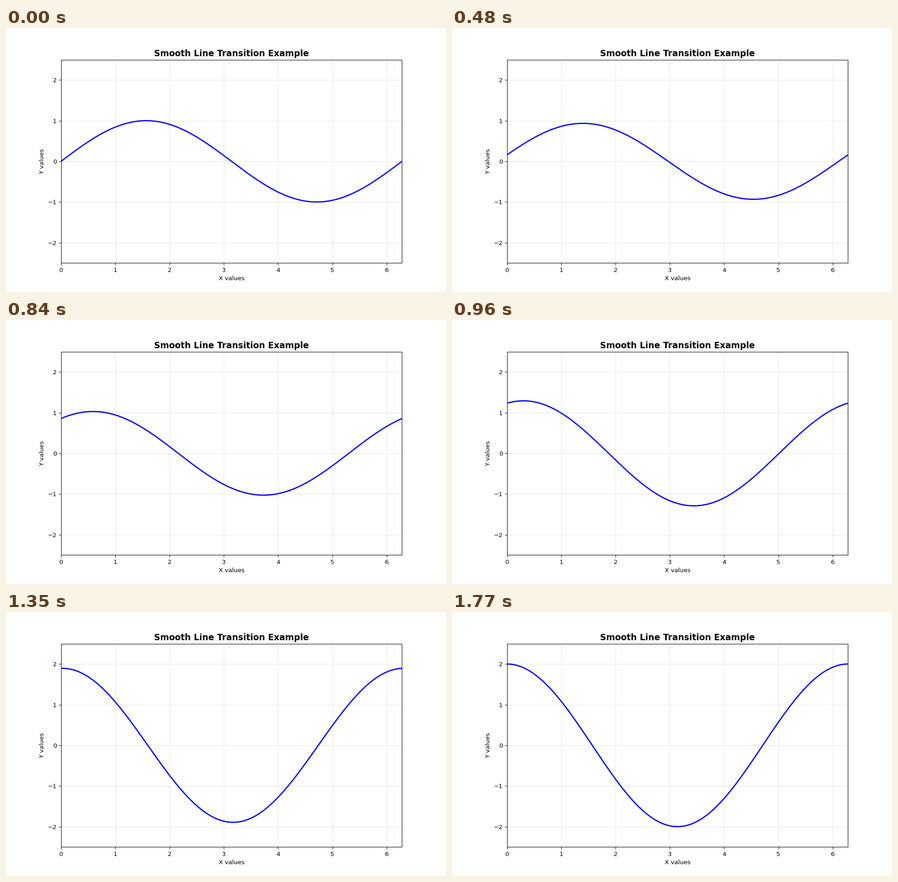
Write a matplotlib script that moves like this. It is 966 by 580 pixels and loops after 1800 ms.

```python
import numpy as np
import matplotlib.pyplot as plt
from matplotlib.animation import FuncAnimation

WIDTH, HEIGHT, DPI = 966, 580, 96.6
FRAMES, INTERVAL = 60, 30

x = np.linspace(0, 2 * np.pi, 200)
start = np.sin(x)
end = 2 * np.cos(x)


def ease_in_out_cubic(t):
    return 4 * t**3 if t < 0.5 else 1 - 4 * (1 - t) ** 3


# The small offset keeps the pixel size from rounding down.
fig, ax = plt.subplots(
    figsize=((WIDTH + 0.001) / DPI, (HEIGHT + 0.001) / DPI), dpi=DPI
)
line, = ax.plot(x, start, color="blue", linewidth=2)
ax.set_xlim(0, 2 * np.pi)
ax.set_ylim(-2.5, 2.5)
ax.set_title("Smooth Line Transition Example", fontsize=14, fontweight="bold")
ax.set_xlabel("X values")
ax.set_ylabel("Y values")
ax.grid(True, alpha=0.3)


def update(frame):
    k = ease_in_out_cubic(frame / (FRAMES - 1))
    line.set_ydata((1 - k) * start + k * end)
    return line,


anim = FuncAnimation(
    fig, update, frames=FRAMES, interval=INTERVAL, repeat=True, repeat_delay=0
)
plt.show()
```
